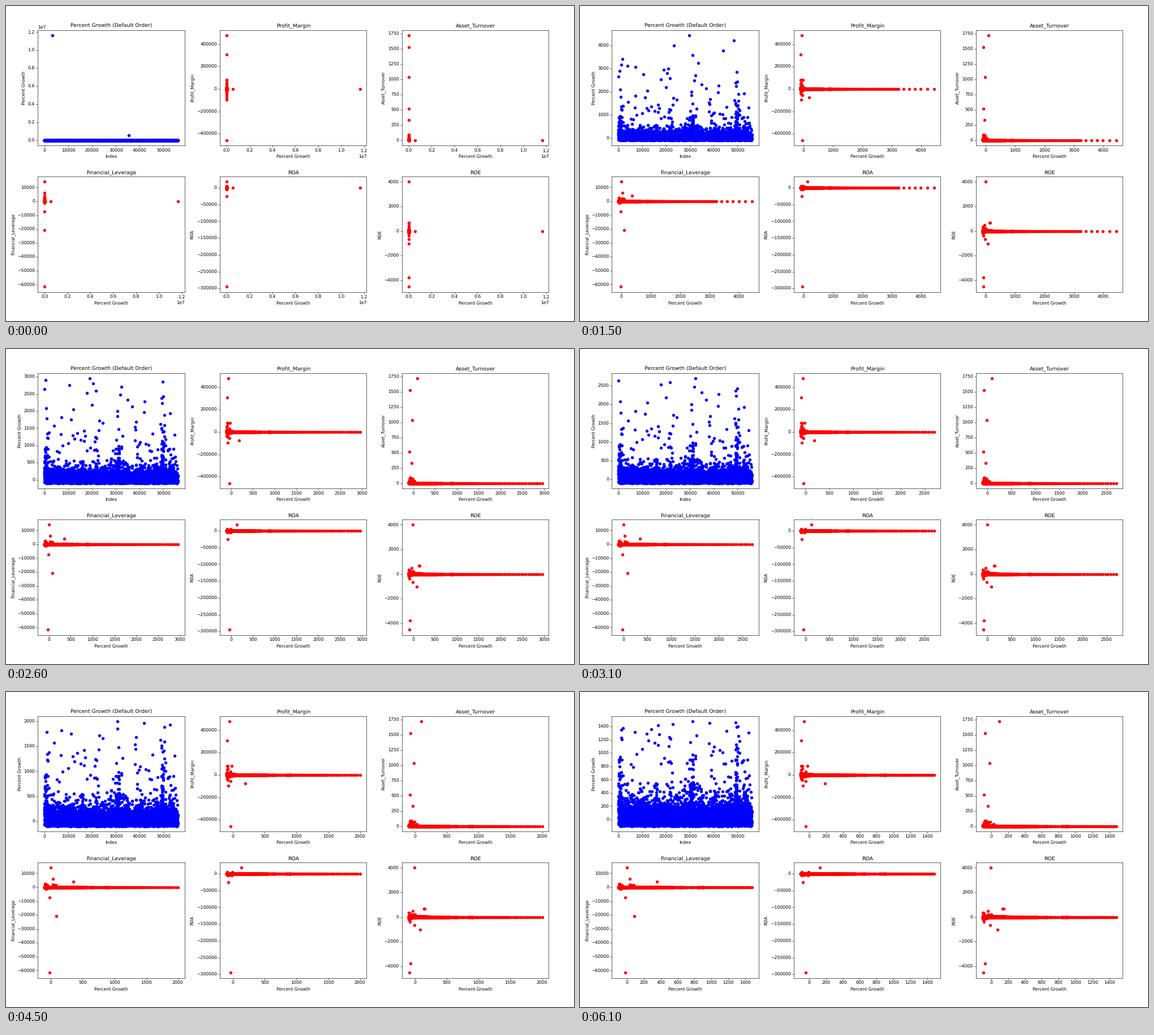
These frames come from a looping animation (1004x558 px, 6.2 s). A matplotlib script:

```python
import numpy as np
import matplotlib.pyplot as plt
from matplotlib.animation import FuncAnimation

plt.rcParams["text.hinting"] = "none"

W, H, DPI = 1004, 558, 55.8
FRAMES, STEP = 62, 100
HOLDS = (24, 50, 58)
LOW, ROWS = -100, 56030
HUBS = (500, 30800, 49600)
OUTLIERS = 118
rng = np.random.default_rng(11)

# rank -> percent growth, filled in between on a log scale
RANKS = (0, 1, 2, 7, 9, 12, 16, 21, 31, 45, 53, 61, 117)
PEAKS = (1.165e7, 5.25e5, 62000, 8500, 6050, 5210, 4210,
         3232, 2700, 2000, 1718, 1480, 830)

# title, extreme dots (percent growth, ratio), size of the halo near zero
PANELS = [
    ("Profit_Margin",
     [(-57, 479000), (-94, 307000), (-77, -98000), (-41, -458000)], 55000),
    ("Asset_Turnover",
     [(95, 1720), (-75, 1527), (-22, 1031), (-85, 520), (-40, 335)], 60),
    ("Financial_Leverage",
     [(0, 14050), (33, 6100), (352, 4150), (-18, -7300), (85, -20600),
      (-20, -61600)], 1700),
    ("ROA", [(127, 17800), (-72, -24500), (-40, -295000)], 3500),
    ("ROE", [(-8, 4000), (77, -1055), (-75, -3800), (-90, -4540)], 430),
]


def any_row(n):
    return rng.uniform(0, ROWS, n)


def near(center, spread, n):
    return np.clip(rng.normal(center, spread, n), 50, ROWS - 100)


def tail(n, start, scale):
    return np.minimum(start + rng.exponential(scale, n), 900)


def make_rows():
    growth = np.exp(np.interp(np.arange(OUTLIERS), RANKS, np.log(PEAKS)))
    hub_rows = near(rng.choice(HUBS, OUTLIERS), 600, OUTLIERS)
    rows = np.where(rng.random(OUTLIERS) < .35, hub_rows, any_row(OUTLIERS))
    rows[:2] = 3300, 35500

    parts = [(rows, growth),
             (any_row(5000), rng.uniform(LOW, 150, 5000)),
             (any_row(1100), tail(1100, 130, 50)),
             (any_row(110), tail(110, 300, 130))]
    for hub in HUBS:
        parts.append((near(hub, 500, 75), tail(75, 150, 230)))
    for hub in np.linspace(3200, 53300, 9):
        parts.append((near(hub, 500, 20), tail(20, 150, 150)))
    rows, growth = np.hstack(parts)
    order = np.argsort(-growth, kind="stable")
    return np.column_stack([rows[order], growth[order]])


def ratio_points(growth, extremes, amp):
    """Flat band, thicker at low growth, with a halo and some extremes."""
    band = rng.normal(0, amp / 6, len(growth)) * np.exp((LOW - growth) / 70)
    halo_x = LOW + rng.exponential(55, 14)
    halo_y = rng.uniform(-1.6, 1.6, 14) * amp
    if min(y for _, y in extremes) > 0:
        band, halo_y = abs(band), abs(halo_y)
    return np.vstack([np.column_stack([growth, band]),
                      np.column_stack([halo_x, halo_y]), extremes])


def padded(lo, hi):
    pad = .05 * (hi - lo)
    return lo - pad, hi + pad


def add_panel(k, title, xlabel, ylabel, color):
    row, col = divmod(k, 3)
    left, bottom = 56.4 + 321.9 * col, H - 247 - 259.6 * row
    ax = fig.add_axes([left / W, bottom / H, 259.1 / W, 204.4 / H])
    ax.set_title(title)
    ax.set_xlabel(xlabel)
    ax.set_ylabel(ylabel)
    return ax, ax.scatter([], [], color=color)


data = make_rows()
growth = np.concatenate([data[data[:, 1] > 250, 1],
                         data[data[:, 1] <= 250, 1][::4]])

fig = plt.figure(figsize=((W + .01) / DPI, (H + .01) / DPI), dpi=DPI,
                 facecolor="white")
main, blue = add_panel(0, "Percent Growth (Default Order)", "Index",
                       "Percent Growth", "blue")
main.set_xlim(*padded(0, ROWS))

ratios = []
for k, (name, extremes, amp) in enumerate(PANELS, 1):
    ax, dots = add_panel(k, name, "Percent Growth", name, "red")
    pts = ratio_points(growth, extremes, amp)
    ax.set_ylim(*padded(pts[:, 1].min(), pts[:, 1].max()))
    ratios.append((ax, dots, pts))


def update(f):
    # rows are in falling order, so each step drops the largest growth
    n = f - (f in HOLDS)
    span = padded(LOW, data[n, 1])
    blue.set_offsets(data[n:])
    main.set_ylim(*span)
    for ax, dots, pts in ratios:
        dots.set_offsets(pts[n:])
        ax.set_xlim(*span)
    return []


anim = FuncAnimation(fig, update, frames=FRAMES, interval=STEP,
                     init_func=lambda: update(0), repeat=True, blit=False)
plt.show()
```
